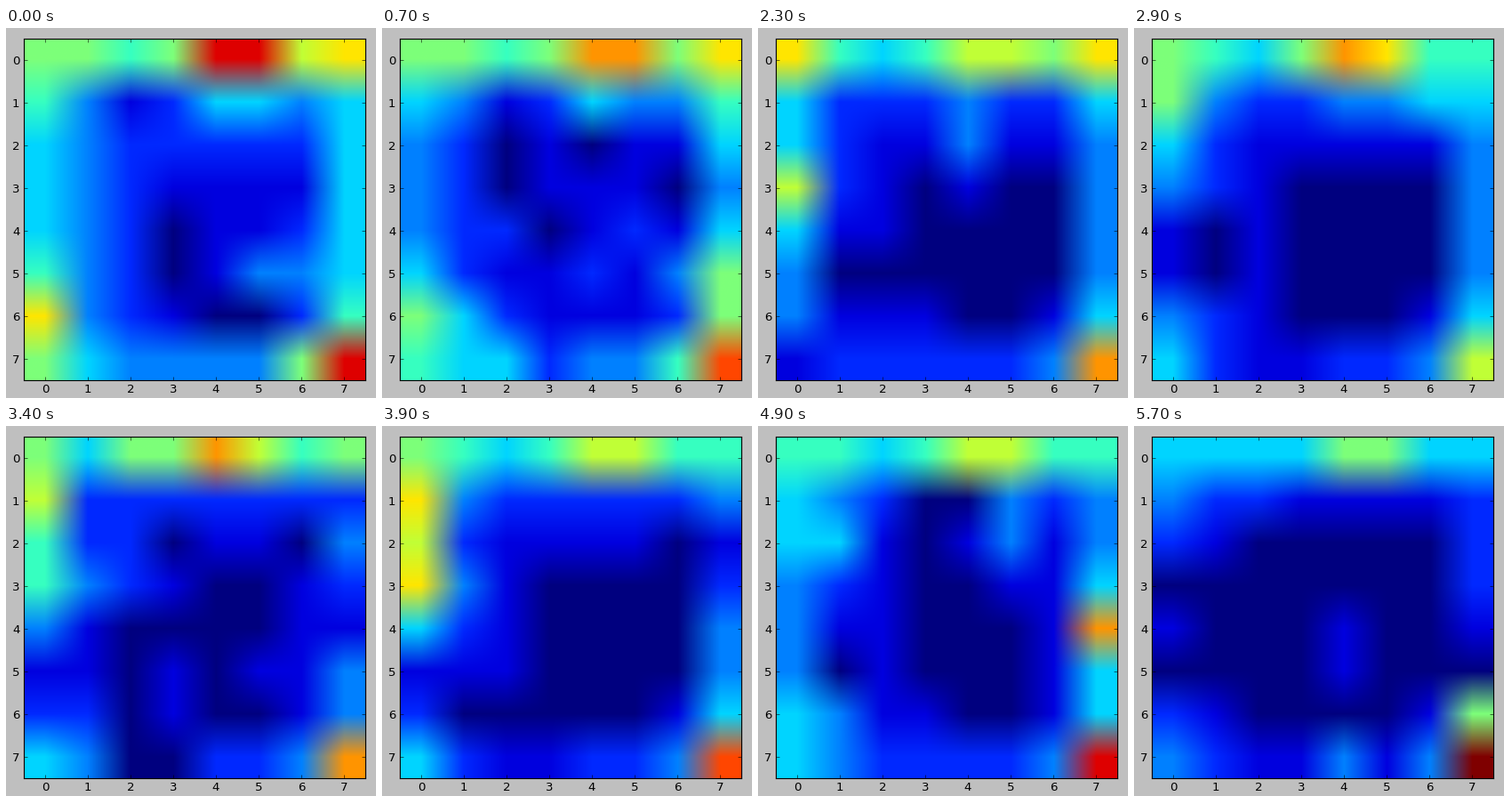
A matplotlib script that plays this animation: 416x416 px, repeating every 5800 ms.

```python
import matplotlib.pyplot as plt
import numpy as np
from matplotlib.animation import FuncAnimation

SIZE, DPI = 416, 80
FRAMES, INTERVAL = 58, 100
CELLS = 8
TOP_LEVEL = 12  # sensor steps from coldest to hottest
BODY_TICK = 14

rows, cols = np.mgrid[:CELLS, :CELLS].astype(float)


def glow(row, col, spread=0.6):
    return np.exp(-((rows - row) ** 2 + (cols - col) ** 2) / spread)


def room():
    """Heat leaking in from the four walls, strongest from the top."""
    last = CELLS - 1
    lamp = np.exp(-((cols - 4.4) ** 2) / 1.5)
    top = (4.5 + 3.5 * lamp) * np.exp(-1.1 * rows)
    left = 3.4 * np.exp(-0.6 * cols)
    right = 3 * np.exp(-1.8 * (last - cols))
    bottom = 2 * np.exp(-1.5 * (last - rows))
    return np.sqrt(top**2 + left**2 + right**2 + bottom**2) - 0.2


ROOM = room()


def scene(warmth, heater, *spots):
    """Room with a corner heater and spots given as (row, column, gain)."""
    field = np.maximum(ROOM + warmth, 0) + heater * glow(7, 7)
    return field + sum(gain * glow(row, col) for row, col, gain in spots)


# Key scenes by tick, blended in between
SCENES = {
    0: scene(1, 6, (0, 4.5, 4), (0, 6.5, 2), (6, 0, 4), (1, 2, -2),
             (4.5, 3, -2), (6, 4.5, -2), (5, 5.5, 3), (7, 6, 2)),
    14: scene(1, 6, (5, 7, 5), (1, 2.5, -2), (5, 1, -2), (3, 0, -2),
              (0, 6, -2)),
    23: scene(0, 6, (0, 0, 3), (0, 7, 3), (3, 0, 4), (2, 4, 2), (7, 0, -3),
              (5, 1, -2)),
    29: scene(0, 4, (0, 4, 2), (1, 0, 2), (1, 6, 2), (4.5, 0.5, -4),
              (7, 2.5, -2)),
    39: scene(0, 7, (1, 0, 4), (2, 0, 2), (3, 0, 4), (5, 0, -2), (6, 1, -2),
              (2, 7, -2), (7, 2.5, -2)),
    49: scene(0, 7.5, (1, 3.5, -3), (2, 1, 2), (2, 5, 2), (4, 7, 6),
              (5, 1, -2), (6, 1, 2)),
    57: scene(-1, 9, (1, 1.5, 1.5), (3, 0, -3), (5, 0, -2), (5, 7, -4),
              (6, 7, 3), (4.5, 4, 1.5), (7, 4, 2)),
}
TICKS = list(SCENES)


def background(tick):
    """Blend the neighbouring scenes, with sensor jitter in between."""
    i = min(np.searchsorted(TICKS, tick, side="right"), len(TICKS) - 1)
    start, end = TICKS[i - 1], TICKS[i]
    part = (tick - start) / (end - start)
    jitter = np.random.default_rng(tick).normal(0, 0.7, ROOM.shape)
    blend = (1 - part) * SCENES[start] + part * SCENES[end]
    return blend + np.sin(np.pi * part) * jitter


def body(tick):
    """A warm bent shape with a soft halo, crossing one column per tick."""
    shift = tick - BODY_TICK
    along = np.linspace(0, 1, 25)
    path_rows = np.interp(along, [0, 0.5, 1], [2, 4, 5])
    path_cols = np.interp(along, [0, 0.5, 1], [5, 4.8, 3]) + shift
    core = [14 * glow(r, c, 1.1) for r, c in zip(path_rows, path_cols)]
    halo = 9 * glow(3, 3.3 + shift, 3)
    return np.maximum(np.max(core, axis=0), halo)


def heat(tick):
    field = np.maximum(background(tick), body(tick))
    return np.clip(np.round(field), 0, TOP_LEVEL)


plt.rcParams.update({"font.family": "DejaVu Sans", "font.size": 12})
fig = plt.figure(figsize=(SIZE / DPI, SIZE / DPI), dpi=DPI, facecolor="0.75")
ax = fig.add_axes([20 / SIZE, 20 / SIZE, 384 / SIZE, 384 / SIZE])
image = ax.imshow(heat(0), cmap="jet", vmin=0, vmax=TOP_LEVEL,
                  interpolation="bilinear", interpolation_stage="rgba")
ax.set_xticks(range(CELLS))
ax.set_yticks(range(CELLS))
ax.tick_params(direction="in", length=4, width=0.5, pad=4, labelsize=12,
               top=True, right=True)
for spine in ax.spines.values():
    spine.set_linewidth(1)


def update(tick):
    image.set_data(heat(tick))
    return [image]


anim = FuncAnimation(fig, update, frames=FRAMES, interval=INTERVAL,
                     repeat=True, repeat_delay=0)
plt.show()
```
